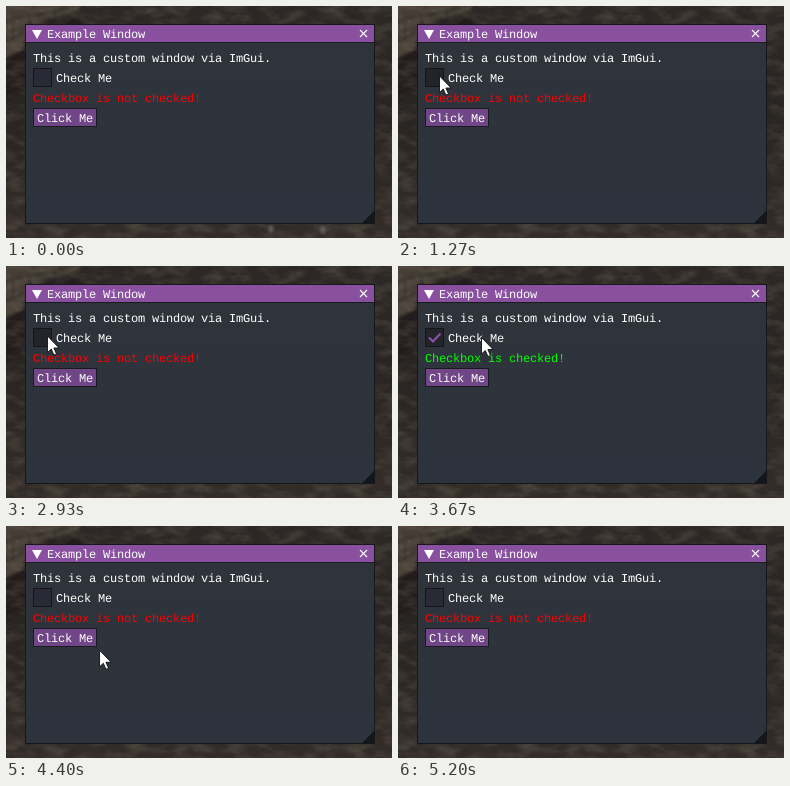
Recreate the animation shown at these times as an HTML page. Size 386x232 px, loop 5.27 s.

```html
<!DOCTYPE html>
<html lang="en">
<head>
<meta charset="utf-8">
<title>Example Window</title>
<style>
  html, body { margin: 0; width: 100%; height: 100%; overflow: hidden; background: #2c2723; }
  svg { display: block; width: 386px; height: 232px; }
  text {
    font: 12px "Liberation Mono", "DejaVu Sans Mono", monospace;
    letter-spacing: -0.2px;
    fill: #fff;
    white-space: pre;
    text-rendering: geometricPrecision;
  }
</style>
</head>
<body>
<svg viewBox="0 0 386 232">
  <defs>
    <linearGradient id="ground" x1="0" y1="0" x2="0" y2="1">
      <stop offset="0" stop-color="#2d2825"/>
      <stop offset=".45" stop-color="#292522"/>
      <stop offset="1" stop-color="#332c27"/>
    </linearGradient>
    <linearGradient id="body" x1="0" y1="0" x2="0" y2="1">
      <stop offset="0" stop-color="#2f343b"/>
      <stop offset="1" stop-color="#2d333c"/>
    </linearGradient>
    <filter id="soft" x="-20%" y="-20%" width="140%" height="140%">
      <feGaussianBlur stdDeviation="1.5"/>
    </filter>
    <filter id="grain" x="0" y="0" width="100%" height="100%">
      <feTurbulence type="fractalNoise" baseFrequency=".05 .11" numOctaves="3" seed="7"/>
      <feColorMatrix values="0 0 0 0 .42  0 0 0 0 .36  0 0 0 0 .3  1.4 0 0 0 -.55"/>
    </filter>
  </defs>

  <!-- ground and stone wall -->
  <rect width="386" height="232" fill="url(#ground)"/>
  <g filter="url(#soft)">
    <path d="M-4-4H77L70 6L40 13L22 24L16 44L-4 54Z" fill="#443c35"/>
    <path d="M-4 54L16 44L24 24L46 15L76 6V18L30 40L20 84L-4 100Z" fill="#201d1b"/>
    <path d="M-4 17L22 10L48 5L74-2M22 10L25 20M48 5L50 13M-4 36L18 28M7 15V34" fill="none" stroke="#282420" stroke-width="2"/>
  </g>
  <rect width="386" height="232" filter="url(#grain)" opacity=".3"/>
  <g id="specks" fill="#77706a" filter="url(#soft)">
    <ellipse cx="265" cy="223" rx="2.5" ry="4"/>
    <ellipse cx="317" cy="224" rx="2.5" ry="4"/>
  </g>

  <!-- window -->
  <rect x="19.5" y="18.5" width="349" height="199" fill="url(#body)" stroke="#15171a"/>
  <rect x="20" y="19" width="348" height="17" fill="#88509f"/>
  <path d="M20 36.5H368" stroke="#191b20"/>
  <path d="M26 24H36L31 33Z" fill="#fff"/>
  <path d="M354 24L361 31M361 24L354 31" stroke="#fff" stroke-width="1.1"/>
  <path d="M368 205V217H356Z" fill="#14171a"/>
  <text x="41" y="32">Example Window</text>
  <text x="27" y="56">This is a custom window via ImGui.</text>

  <rect id="box" x="27.5" y="62.5" width="18" height="18" stroke="#15161a"/>
  <path id="tick" d="M31 71.5L35 75.5L42.5 67.5" fill="none" stroke="#8a51a2" stroke-width="2.2"/>
  <text x="50" y="76">Check Me</text>
  <text id="status" x="27" y="96"></text>

  <rect id="button" x="27.5" y="102.5" width="63" height="18" stroke="#191a20"/>
  <text x="31" y="116">Click Me</text>

  <path id="cursor" d="M0 0V16.5L3.8 13L6.4 19L9 17.9L6.4 12H11.6Z" fill="#fff" stroke="#111" stroke-width=".9"/>
</svg>

<script>
const LOOP = 5270, STEP = 200 / 3;
const $ = id => document.getElementById(id);

// [time, x, y] of the pointer tip
const path = [
  [530, 62, 236], [670, 48, 190], [800, 37, 143], [867, 34.5, 130],
  [933, 36, 111], [1000, 39, 88], [1067, 41, 74], [1133, 41.5, 70],
  [3400, 41.5, 70], [3467, 50, 70], [3600, 77, 71], [3667, 83.5, 71.5],
  [4267, 83.5, 71.5], [4333, 86, 86], [4400, 93.5, 124],
  [4467, 99, 160], [4533, 104, 198], [4600, 108, 238]
];
const clicks = [1733, 2733, 3267, 4000];

function pointer(t) {
  const i = path.findIndex(p => p[0] > t);
  if (i < 1) return [0, 300];
  const [t0, x0, y0] = path[i - 1], [t1, x1, y1] = path[i];
  const k = (t - t0) / (t1 - t0);
  return [x0 + (x1 - x0) * k, y0 + (y1 - y0) * k];
}

function draw(time) {
  const t = Math.floor((time % LOOP + 5) / STEP) * STEP + 0.5;
  const [x, y] = pointer(t);
  const over = (l, top, r, b) => x >= l && x < r && y >= top && y < b;
  const checked = clicks.filter(c => c <= t).length % 2 === 1;

  $("cursor").setAttribute("transform", `translate(${x} ${y})`);
  $("box").setAttribute("fill", over(27, 62, 107, 81) ? "#222429" : "#292a36");
  $("button").setAttribute("fill", over(27, 102, 91, 121) ? "#81509a" : "#704687");
  $("tick").setAttribute("visibility", checked ? "visible" : "hidden");
  $("status").textContent = checked ? "Checkbox is checked!" : "Checkbox is not checked!";
  $("status").style.fill = checked ? "#00ff00" : "#ff0000";
  $("specks").setAttribute("opacity", t < 66 ? 0.7 : t < 132 ? 0.3 : 0);
}

const start = performance.now();
function tick() {
  draw(performance.now() - start);
  requestAnimationFrame(tick);
}
tick();
</script>
</body>
</html>
```
